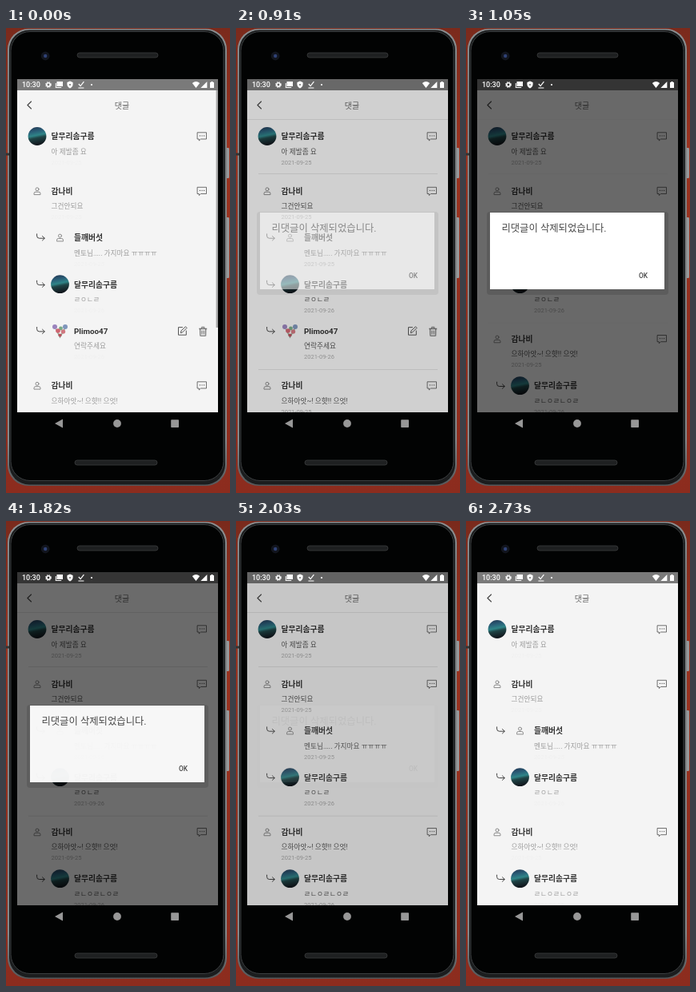
Animation of 280 by 582 pixels, one loop 2800 ms. Source, as an HTML page:

```html
<!DOCTYPE html>
<html lang="ko">
<head>
<meta charset="utf-8">
<title>댓글</title>
<style>
html, body { margin: 0; width: 100%; height: 100%; overflow: hidden; background: #92301f; }
svg { display: block; width: 100vw; height: 100vh; }
text { font-family: Roboto, "Noto Sans CJK KR", "Noto Sans CJK", "Noto Sans CJK JP", sans-serif; }
.name { font-size: 9.8px; font-weight: 700; fill: #333; }
.body { font-size: 8.7px; fill: #555; }
.date { font-size: 7.5px; fill: #aaa; }
.line { stroke: #dedede; }
.icon { fill: none; stroke: #444; stroke-linecap: round; stroke-linejoin: round; }

/* every change lands on a 70 ms tick, 2.5% of the loop */
.bar, .trash, .before, .after, .dim, .dialog, .body, .date, .line {
  animation: 2800ms step-end infinite;
}
.bar { animation-name: bar; }
.trash { animation-name: press; }
.before { animation-name: before; }
.after { animation-name: after; }
.dim { animation-name: dim; }
.dialog { animation-name: dialog; }
.body { animation-name: body; }
.date { animation-name: date; }
.line { animation-name: line; }

@keyframes bar { 0% { opacity: 1 } 2.5%, 100% { opacity: 0 } }
@keyframes press {
  0% { opacity: 1 } 10% { opacity: .6 } 12.5% { opacity: .25 } 15% { opacity: 0 }
  20% { opacity: .12 } 22.5% { opacity: .4 } 25% { opacity: .75 } 27.5%, 100% { opacity: 1 }
}
@keyframes before { 0% { visibility: visible } 37.5%, 100% { visibility: hidden } }
@keyframes after { 0% { visibility: hidden } 37.5%, 100% { visibility: visible } }
@keyframes dim {
  0% { opacity: 0 } 32.5% { opacity: .15 } 35% { opacity: .44 } 37.5% { opacity: .57 }
  65% { opacity: .56 } 67.5% { opacity: .51 } 70% { opacity: .42 } 72.5% { opacity: .19 }
  75%, 100% { opacity: 0 }
}
@keyframes dialog {
  0% { opacity: 0 } 32.5% { opacity: .52 } 35% { opacity: .9 } 37.5% { opacity: 1 }
  65% { opacity: .95 } 67.5% { opacity: .72 } 70% { opacity: .38 } 72.5% { opacity: .06 }
  75%, 100% { opacity: 0 }
}
@keyframes body { 0% { opacity: .55 } 32.5% { opacity: 1 } 75%, 100% { opacity: .55 } }
@keyframes date { 0% { opacity: .06 } 32.5% { opacity: 1 } 75%, 100% { opacity: .06 } }
@keyframes line { 0% { opacity: 0 } 32.5% { opacity: 1 } 37.5% { opacity: .3 } 65% { opacity: 1 } 75%, 100% { opacity: 0 } }
</style>
</head>
<body>
<svg viewBox="0 0 280 582" preserveAspectRatio="none">
  <defs>
    <linearGradient id="wall" x2="0" y2="1">
      <stop offset="0" stop-color="#7a2a1c"/><stop offset=".25" stop-color="#9a3320"/>
      <stop offset="1" stop-color="#8c2c1e"/>
    </linearGradient>
    <linearGradient id="rim" x2="0" y2="1">
      <stop offset="0" stop-color="#8d9092"/><stop offset=".12" stop-color="#7c7f81"/>
      <stop offset=".9" stop-color="#85888a"/><stop offset="1" stop-color="#55585a"/>
    </linearGradient>
    <linearGradient id="sky" x2=".2" y2="1">
      <stop offset="0" stop-color="#22324f"/><stop offset=".3" stop-color="#2a5f78"/>
      <stop offset=".52" stop-color="#2f8588"/><stop offset=".66" stop-color="#1f4446"/>
      <stop offset="1" stop-color="#12191f"/>
    </linearGradient>
    <clipPath id="view"><rect x="14" y="64" width="251" height="417"/></clipPath>

    <circle id="photo" r="11.4" fill="url(#sky)"/>
    <g id="person" class="icon" style="stroke:#808080" stroke-width=".9">
      <circle cy="-2.2" r="2"/><path d="M-4 4.2v-1q0-2 2-2h4q2 0 2 2v1z"/>
    </g>
    <g id="bunch">
      <path d="M-5-2L0 8L6-3" fill="none" stroke="#86a58c" stroke-width="1.5"/>
      <circle cx="-6.500" cy="-5" r="3" fill="#9a83bd"/><circle cx="6.500" cy="-5" r="3" fill="#7f95bb"/>
      <circle cx="1" cy="-3" r="2.4" fill="#79aa88"/><circle cx="-2.500" cy="0" r="2.800" fill="#cf6570"/>
      <circle cx="4" cy="1" r="2.700" fill="#d17880"/><circle cx="0" cy="5.500" r="2.100" fill="#b8525e"/>
    </g>
    <g id="chat" class="icon">
      <path d="M-5.5-4.7h11v8.2h-7l-2.2 2v-2h-1.8z" stroke-width=".75"/>
      <path d="M-2.6-.6h.1M0-.6h.1M2.6-.6h.1" stroke-width="1.1"/>
    </g>
    <path id="reply" class="icon" d="M-4.7-4.5v2.2q0 3.2 3 3.2h6.5M2.2-1.8L5 .9L2.2 3.6" stroke-width="1"/>
    <g id="edit" class="icon" stroke-width=".9">
      <path d="M0-4.4h-5v9.6h9.8V0"/><path d="M-2 2.2l.6-2.4L4-5.2l1.6 1.6L.3 1.7z"/>
    </g>
    <g id="bin" class="icon" stroke-width=".9">
      <path d="M-4.600-3.3h9.200M-1.6-3.5v-1.7h3.2v1.7M-3.6-3.2l.3 8.700h6.600l.3-8.700M-1.2-.8v4M1.200-.8v4"/>
    </g>
  </defs>

  <rect width="280" height="582" fill="url(#wall)"/>
  <g fill="#96999b">
    <rect x="274" y="150" width="5" height="38" rx="1.2"/>
    <rect x="274" y="237" width="5" height="76" rx="1.2"/>
  </g>
  <rect x="2" y="1" width="274" height="572" rx="26" fill="url(#rim)"/>
  <rect x="4" y="2.5" width="270" height="569" rx="25" fill="#1b1d1e"/>
  <rect x="6" y="4.500" width="266" height="562" rx="24" fill="#020303" stroke="#3b3e40"/>
  <path d="M0 158h4" stroke="#333" stroke-width="3"/>
  <circle cx="49.2" cy="35" r="5.4" fill="#12151d"/>
  <circle cx="49.2" cy="35" r="2.2" fill="#2f4276"/>
  <g fill="#1e2021" stroke="#3b3d3e" stroke-width=".8">
    <rect x="89" y="31" width="101" height="6" rx="3"/>
    <rect x="86" y="541" width="103" height="6" rx="3"/>
  </g>
  <g fill="#979797">
    <path d="M61 495l10-5.5v11z"/><circle cx="139" cy="495" r="4.9"/>
    <rect x="206.2" y="490.2" width="9.8" height="9.8" rx=".8"/>
  </g>

  <g clip-path="url(#view)">
    <rect x="14" y="64" width="251" height="417" fill="#f4f4f4"/>
    <rect x="14" y="64" width="251" height="14" fill="#7a7a7a"/>
    <path class="icon" d="M31.5 92l-4.6 4.5l4.6 4.5" stroke-width="1.1"/>
    <text x="145" y="100.5" text-anchor="middle" font-size="10" fill="#666">댓글</text>
    <path class="line" d="M14 114.5h251"/>
    <g id="top"></g>
    <g id="old" class="before"></g>
    <g id="new" class="after"></g>
    <rect class="bar" x="262.6" y="78" width="2.4" height="297" fill="#a6a6a6"/>
    <rect class="dim" x="14" y="64" width="251" height="417"/>
  </g>

  <g fill="#fff">
    <text x="20" y="74.4" font-size="9" font-weight="500">10:30</text>
    <circle cx="53" cy="71" r="2.2" fill="none" stroke="#fff" stroke-width="1.6"/>
    <circle cx="53" cy="71" r="3.5" fill="none" stroke="#fff" stroke-width="1" stroke-dasharray="1.4 1.4"/>
    <path d="M63.5 67h7.5v6h-7.5zM61.8 69v6h7.4v-1h-6.4v-5z"/>
    <path d="M80 66.6l3.6 1.4v2.6q0 3.2-3.6 4.8q-3.6-1.6-3.6-4.8V68z"/>
    <path d="M90.8 70l2.3 2.6l4.3-5.4M90.4 75h7" fill="none" stroke="#fff" stroke-width="1.2"/>
    <circle cx="107" cy="71" r="1.1"/>
    <path d="M232.8 69q4.7-3.8 9.4 0L237.5 75z"/>
    <path d="M251.4 67v8h-8z"/>
    <path d="M255 68h1.3v-1h2.4v1h1.3v7h-5z"/>
  </g>
  <circle cx="80" cy="71" r="1.1" fill="#777"/>

  <g class="dialog">
    <rect x="26" y="230" width="227" height="104" rx="4" opacity=".12"/>
    <rect x="30" y="231" width="218" height="96" fill="#fff"/>
    <text x="44.4" y="254.7" font-size="12.35" fill="#484848">리댓글이 삭제되었습니다.</text>
    <text x="216" y="313" font-size="8.4" font-weight="500" fill="#444">OK</text>
  </g>
</svg>
<script>
const [MOON, PERSIMMON, PERILLA, PLIMOO] = ['달무리솜구름', '감나비', '들깨버섯', 'Plimoo47'];

const use = (id, x, y, cls = '') => `<use href="#${id}" class="${cls}" x="${x}" y="${y}"/>`;
const text = (cls, x, y, s) => `<text class="${cls}" x="${x}" y="${y}">${s}</text>`;

function row(y, pic, name, body, day, isReply) {
  const x = isReply ? 85 : 56.5;
  return (isReply ? use('reply', 43.3, y) : use('chat', 245, y))
    + use(pic, x - 17.5, y)
    + text('name', x, y + 3.8, name)
    + text('body', x, y + 22.2, body)
    + text('date', x, y + 35.2, '2021-09-' + day);
}
const rule = y => `<path class="line" d="M28 ${y}h224"/>`;
const shout = y => rule(y - 20) + row(y, 'person', PERSIMMON, '으하아앗~! 으햣!! 으엇!', 25);
const fill = (id, ...parts) => document.getElementById(id).innerHTML = parts.join('');

fill('top',
  row(135.5, 'photo', MOON, '아 제발좀 요', 25),
  rule(182.5),
  row(204, 'person', PERSIMMON, '그건안되요', 25),
  row(262.3, 'person', PERILLA, '멘토님..... 가지마요 ㅠㅠㅠㅠ', 25, true),
  row(320.7, 'photo', MOON, 'ㄹㅇㄴㄹ', 26, true));
fill('old',
  row(379, 'bunch', PLIMOO, '연락주세요', 26, true),
  use('edit', 220.5, 379),
  use('bin', 246.2, 379.7, 'trash'),
  shout(447.5));
fill('new',
  shout(389.2),
  row(447.6, 'photo', MOON, 'ㄹㄴㅇㄹㄴㅇㄹ', 26, true));
</script>
</body>
</html>
```
